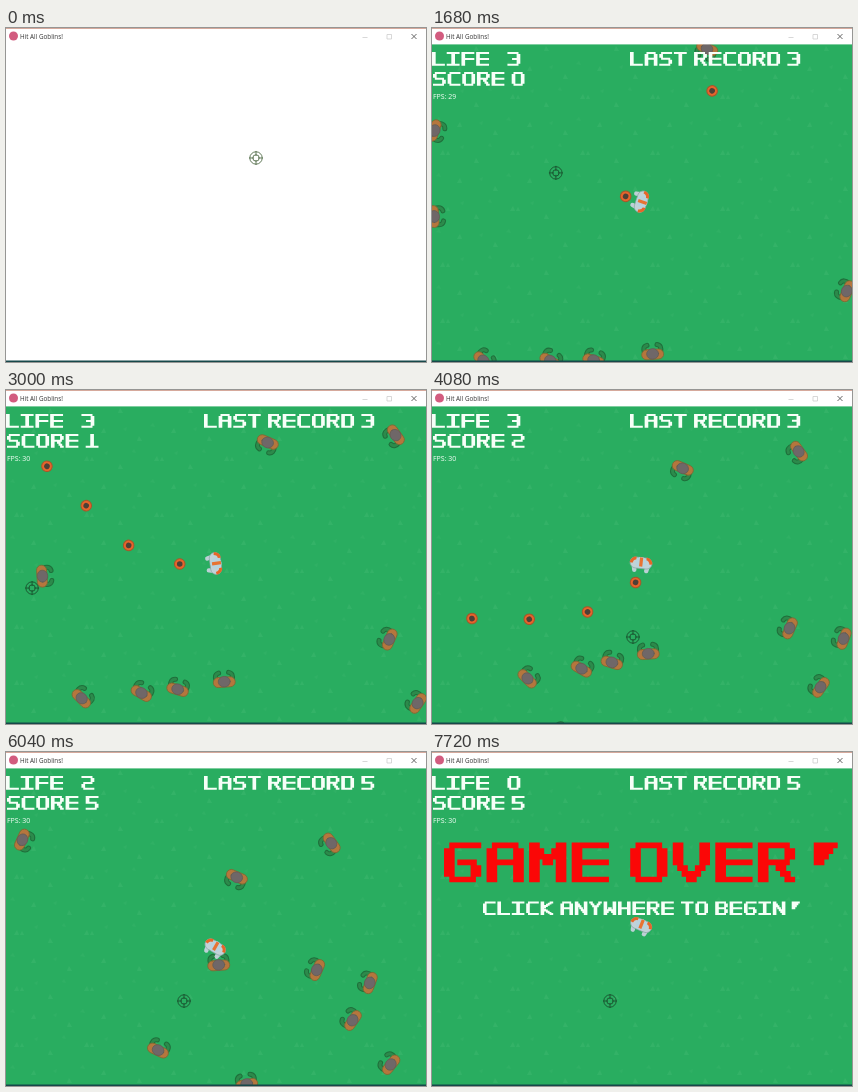
Animation of 420x334 px, one loop 7760 ms. Source, as an HTML page:

```html
<!DOCTYPE html>
<html lang="en">
<head>
<meta charset="utf-8">
<style>
  html, body { margin: 0; width: 100%; height: 100%; overflow: hidden; background: #fff; }
  svg { display: block; width: 420px; height: 334px; }
  .ui { font-family: "Open Sans", "Noto Sans", sans-serif; }
</style>
</head>
<body>
<svg viewBox="0 0 420 334">
  <defs>
    <pattern id="grass" width="70" height="56" patternUnits="userSpaceOnUse">
      <path fill="#33b267" d="M8 15l3-5 2 5zM14 15l2-4 2 4zM42 23l2-5 3 5zM25 43l3-5 2 5zM61 51l2-5 3 5z"/>
      <path fill="#2fb064" d="M28 7l4-2-1 4zM56 6l2-3 2 4zM4 36l3-3 2 4zM47 39l4-2-1 4z"/>
    </pattern>
    <g id="zombie" stroke-linejoin="round" stroke-linecap="round">
      <g fill="none">
        <path id="arms" d="M-8 0Q-10-7-5-8M8 0Q10-7 5-8" stroke="#1f6f3b" stroke-width="5"/>
        <path d="M-8 0Q-10-7-5-8M8 0Q10-7 5-8" stroke="#2c8a4b" stroke-width="3"/>
      </g>
      <rect x="-11" y="-3.5" width="22" height="10" rx="5" fill="#b5763d" stroke="#7d6a34" stroke-width=".8"/>
      <ellipse cy="1" rx="6" ry="5.3" fill="#6f6768" stroke="#625c54" stroke-width=".7"/>
    </g>
    <g id="hero">
      <path d="M-7-2l1-5M7-2l-1-5" stroke="#bdd0d6" stroke-width="4.4" stroke-linecap="round"/>
      <rect x="-11" y="-5" width="22" height="11" rx="5.5" fill="#c2d2d8" stroke="#89a7a5" stroke-width=".7"/>
      <path d="M-10 0Q-9 5-5 5M10 0Q9 5 5 5" fill="none" stroke="#e76628" stroke-width="3"/>
      <circle cy="1" r="5.6" fill="#b8d3de"/>
      <path d="M0-3v9" stroke="#e87332" stroke-width="3.2"/>
    </g>
    <g id="shot">
      <circle r="5.3" fill="#e8632b" stroke="#a4572b"/>
      <circle r="2.8" fill="#4d4036"/>
    </g>
  </defs>
  <rect width="420" height="334" fill="#fff"/>
  <g id="game">
    <rect y="16" width="420" height="318" fill="#29ad60"/>
    <rect y="16" width="420" height="318" fill="url(#grass)"/>
    <g id="shots"></g>
    <g id="horde"></g>
    <use id="player" href="#hero"/>
    <g id="hud"></g>
    <text id="fps" class="ui" x="1" y="70.5" font-size="7" fill="#f4fff6"></text>
  </g>
  <g id="cross" fill="none" stroke-width=".9">
    <circle r="6.2"/><circle r="3.2"/>
    <path d="M-7 0h5M2 0h5M0-7v5M0 2v5"/>
  </g>
  <rect width="420" height="16.4" fill="#fff"/>
  <path d="M0 .5h420" stroke="#d6a99c"/>
  <path d="M0 333.3h420" stroke="#17484a" stroke-width="1.4"/>
  <circle cx="7.5" cy="8" r="4.5" fill="#d25c7f"/>
  <text class="ui" x="14" y="10.8" font-size="6.3" fill="#333">Hit All Goblins!</text>
  <path d="M356.5 9.5h5M381 6.5h4.5v4.5h-4.5z" fill="none" stroke="#c8c8c8" stroke-width=".7"/>
  <path d="M405.5 6l5 5m0-5l-5 5" stroke="#555" stroke-width=".9"/>
</svg>
<script>
const LOOP = 7760, OPEN = 200, BEGIN = 900, OVER = 6950;
const HOME = { x: 210, y: 174 }, WALK = 0.026, SHOT_SPEED = 0.279;
const SPAWN_RADIUS = 253, HIT_RADIUS = 13, FIRE_EVERY = 190;
const $ = id => document.getElementById(id);
const clamp = (v, lo, hi) => Math.min(hi, Math.max(lo, v));

// Block letters: a 2 x 1 pen moves between the keys of a numeric keypad
// laid over 7 x 7 cells. Turns inside a stroke lose their corner cell.
const STROKES = {
  A: '1793 46', B: '71 7964 4631', C: '9713', D: '71 7931', E: '97 71 13 46',
  F: '97 71 46', G: '971365', H: '71 93 46', I: '79 82 13', K: '71 49 43',
  L: '71 13', M: '71 93 75 59', N: '71 73 93', O: '479314', R: '71 7964 53',
  S: '974631', T: '79 82', V: '74 42 26 69', W: '71 93 15 53', Y: '75 95 52',
  '!': '98 95 85 22', 0: '479314', 1: '82 13', 2: '796413', 3: '79631 56',
  4: '74 46 93', 5: '97 74 4631'
};
const key = k => ({ x: (k - 1) % 3 * 2.5, y: 6 - Math.floor((k - 1) / 3) * 3 });
function strokeCells(keys, left) {
  let d = '';
  for (let i = 1; i < keys.length; i++) {
    const a = key(keys[i - 1]), b = key(keys[i]);
    const steps = Math.ceil(Math.max(Math.abs(b.x - a.x), Math.abs(b.y - a.y)));
    const from = i > 1 ? 1 : 0, to = i < keys.length - 1 ? steps - 1 : steps;
    for (let s = from; s <= to; s++) {
      const x = a.x + (b.x - a.x) * s / steps, y = a.y + (b.y - a.y) * s / steps;
      d += `M${left + x} ${y}h2v1h-2z`;
    }
  }
  return d;
}
function outline(text) {
  let left = 0, d = '';
  for (const ch of text) {
    if (ch !== ' ') d += STROKES[ch].split(' ').map(keys => strokeCells(keys, left)).join('');
    left += ch === ' ' ? 3 : 8;
  }
  return d;
}

function add(parent, tag, attrs) {
  const el = document.createElementNS('http://www.w3.org/2000/svg', tag);
  for (const name in attrs) el.setAttribute(name, attrs[name]);
  return parent.appendChild(el);
}
function label(x, y, unit, fill = '#f7fff8') {
  const el = add($('hud'), 'path', {
    transform: `translate(${x} ${y}) scale(${unit} ${unit * 1.07})`, fill, role: 'img'
  });
  return text => {
    if (el.getAttribute('aria-label') === text) return;
    el.setAttribute('aria-label', text);
    el.setAttribute('d', outline(text));
  };
}
const life = label(0, 24, 1.84), score = label(1, 44, 1.83), record = label(198, 24, 1.83);
const banner = label(12, 90.5, 5.32, '#fb0707'), prompt = label(51, 149.5, 1.8);

// The crosshair moves straight between a few points: time, x, y.
const aimPath = [
  [0, 250, 130], [1210, 263, 90], [1600, 127, 145], [1680, 124, 145], [2300, 58, 86],
  [2490, 48, 101], [2871, 30, 174], [3000, 26, 198], [3440, 60, 222], [3820, 145, 231],
  [4080, 201, 247], [4580, 191, 248], [4770, 172, 244], [4880, 178, 249], [LOOP, 178, 249]
];
function aimAt(t) {
  const i = aimPath.findIndex(p => p[0] > t);
  const [t0, x0, y0] = aimPath[i - 1], [t1, x1, y1] = aimPath[i];
  const k = (t - t0) / (t1 - t0);
  return { x: x0 + (x1 - x0) * k, y: y0 + (y1 - y0) * k };
}

// Walkers come straight in: bearing in degrees, distance at time zero.
const walkers = [
  [-67, 209], [199, 262], [176, 251], [135, 267], [120, 226], [107, 208], [86, 195], [23.5, 266],
  [34.6, 322], [-35.7, 298], [20.3, 320], [38.4, 379], [115, 293], [204, 368], [79, 317]
].map(([bearing, start]) => ({
  angle: bearing * Math.PI / 180, start, end: OVER, el: add($('horde'), 'use', { href: '#zombie' })
}));

// Two single clicks, then steady fire towards the crosshair.
const fireTimes = [1210, 1619];
for (let t = 1921; t < 4800; t += FIRE_EVERY) fireTimes.push(t);
const shots = fireTimes.map(t => {
  const aim = aimAt(t);
  const shot = {
    t, angle: Math.atan2(aim.y - HOME.y, aim.x - HOME.x), end: OVER,
    el: add($('shots'), 'use', { href: '#shot' })
  };
  for (const w of walkers) {
    const meet = (w.start + SHOT_SPEED * t) / (SHOT_SPEED + WALK);
    const dist = SHOT_SPEED * (meet - t), turn = w.angle - shot.angle;
    const hit = Math.cos(turn) > 0 && Math.abs(dist * Math.sin(turn)) < HIT_RADIUS;
    if (hit && dist < SPAWN_RADIUS && meet < Math.min(w.end, shot.end)) w.end = shot.end = meet;
  }
  return shot;
});

const show = (el, on) => el.setAttribute('visibility', on ? 'inherit' : 'hidden');
const place = (el, x, y, turn = 0) =>
  el.setAttribute('transform', `translate(${x.toFixed(2)} ${y.toFixed(2)}) rotate(${turn.toFixed(1)})`);
function placeAround(el, angle, dist) {
  place(el, HOME.x + Math.cos(angle) * dist, HOME.y + Math.sin(angle) * dist, angle * 180 / Math.PI - 90);
}

function draw(t) {
  const over = t >= OVER, aim = aimAt(t);
  const px = 209, py = 173.5 + (over ? 0 : 22 * clamp((t - 5400) / 580, 0, 1));
  show($('game'), t >= OPEN);
  place($('cross'), aim.x, aim.y);
  $('cross').setAttribute('stroke', t < OPEN ? '#526b48' : '#19502d');
  place($('player'), px, py, Math.atan2(aim.y - py, aim.x - px) * 180 / Math.PI + 90);

  for (const w of walkers) {
    const dist = Math.max(38, w.start - WALK * t);
    placeAround(w.el, w.angle, dist);
    show(w.el, t >= BEGIN && t < w.end && dist < SPAWN_RADIUS);
  }
  for (const s of shots) {
    placeAround(s.el, s.angle, SHOT_SPEED * (t - s.t));
    show(s.el, t >= s.t && t < s.end);
  }

  const points = walkers.filter(w => w.end < OVER && t >= w.end).length;
  life('LIFE   ' + (3 - clamp(Math.floor((t - 5450) / 500), 0, 3)));
  score('SCORE ' + points);
  record('LAST RECORD ' + Math.max(3, points));
  banner(over ? 'GAME OVER!' : '');
  prompt(over || t < BEGIN ? 'CLICK ANYWHERE TO BEGIN!' : '');
  $('fps').textContent = 'FPS: ' + (t < 2000 ? 29 : 30);
}

const start = performance.now();
function tick() {
  draw((performance.now() - start) % LOOP);
  requestAnimationFrame(tick);
}
tick();
</script>
</body>
</html>
```
